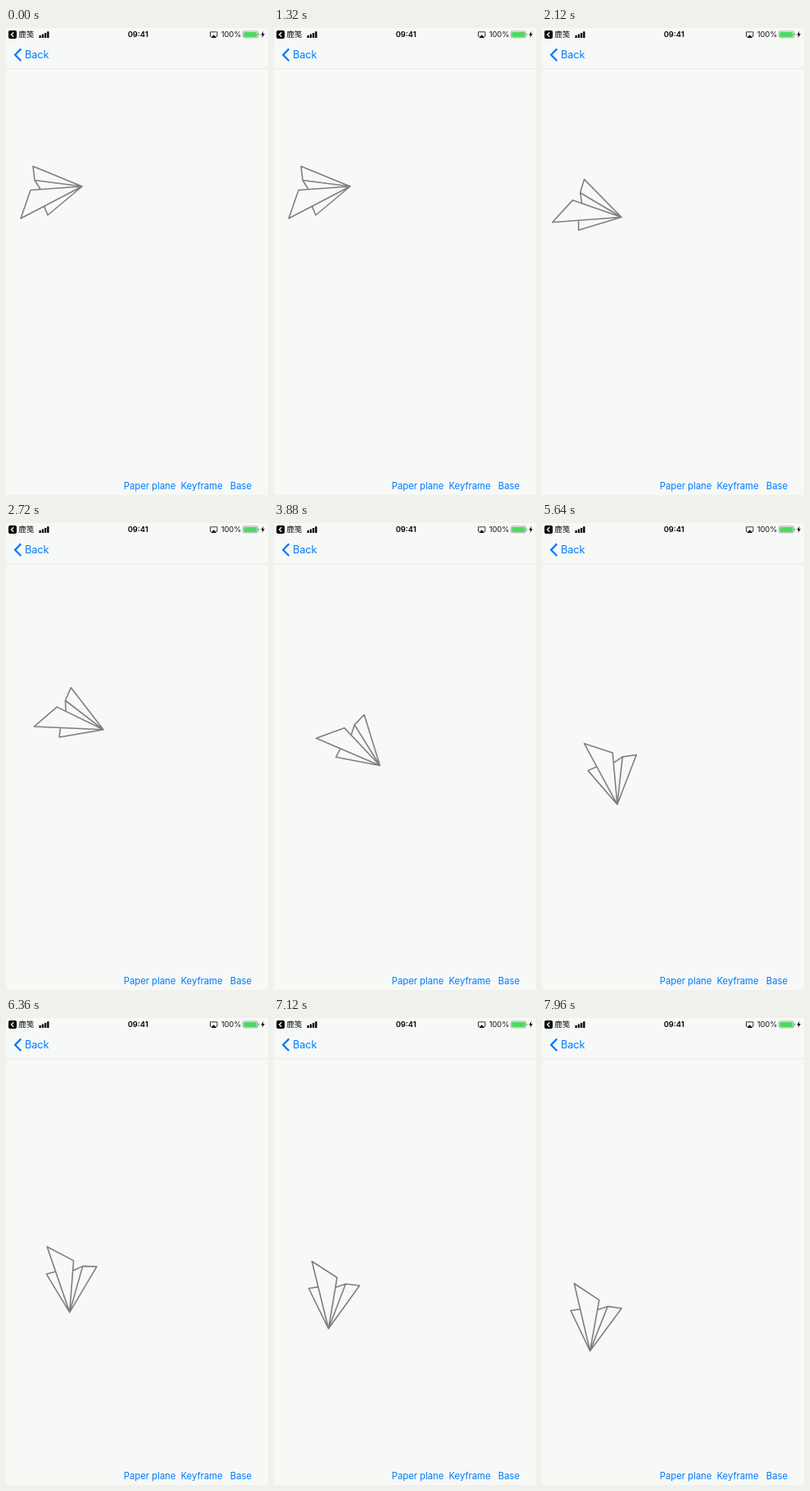
Recreate the animation shown at these times as an HTML page. Size 320x569 px, loop 8 s.

```html
<!DOCTYPE html>
<html lang="en">
<head>
<meta charset="utf-8">
<title>Paper plane</title>
<style>
  html, body { margin: 0; width: 100%; height: 100%; overflow: hidden; background: #f7f9f7; }
  svg { display: block; width: 320px; height: 569px; font-family: Inter, sans-serif; }
  .tint { fill: #007aff; }
  .nav { font-size: 12.8px; letter-spacing: -.12px; }
  .tool { font-size: 11.3px; letter-spacing: -.03px; }
  .status { font-size: 9.4px; fill: #111; }
  .clock { font-weight: 600; fill: #000; }
  .cjk { font-family: "Noto Sans CJK SC", "Noto Sans CJK", sans-serif; font-size: 9.6px; }
  .plane { fill: none; stroke: #7f7f7f; stroke-width: 1.6; stroke-linejoin: round; }
</style>
</head>
<body>
<svg viewBox="0 0 320 569">
  <rect width="320" height="569" fill="#f7f9f7"/>

  <!-- status bar -->
  <rect x="3" y="3" width="10" height="10" rx="2"/>
  <path d="M9.3 5.2 6.4 8l2.9 2.8" fill="none" stroke="#fff" stroke-width="1.3"/>
  <text class="status cjk" x="15.2" y="11.4">鹿笺</text>
  <path d="M40.5 9h2.3v3h-2.3zM43.8 7.6h2.3V12h-2.3zM47 6h2.3v6H47zM50.2 4.2h2.3V12h-2.3z"/>
  <text class="status clock" x="161.2" y="11.4" text-anchor="middle">09:41</text>
  <path d="M251 10.2h-1.5V4.8h8.4v5.4h-1.5" fill="none" stroke="#222" stroke-width=".9"/>
  <path d="M253.7 8.2 257 12h-6.6z"/>
  <text class="status" x="287.5" y="11.4" text-anchor="end">100%</text>
  <rect x="289.4" y="3.9" width="18.2" height="8" rx="1.8" fill="none" stroke="#8b8d8b" stroke-width=".7"/>
  <rect x="290.4" y="4.9" width="16.2" height="6" rx="1" fill="#4cd964"/>
  <path d="M308.4 6.4q1 .3 1 1.5t-1 1.5z" fill="#8b8d8b"/>
  <path d="M314.6 3.8 311.3 8.4h2.1l-.9 3.6 3.5-4.8h-2.2z"/>

  <!-- navigation bar -->
  <path d="M18.3 25.4 11.1 32.7l7.2 7.3" fill="none" stroke="#007aff" stroke-width="2.3"/>
  <text class="tint nav" x="22.9" y="37.4">Back</text>
  <rect y="49" width="320" height="1" fill="#e8eae8"/>

  <!-- origin is the corner that rides along the curve -->
  <path id="plane" class="plane"
        d="M78 32 18 7.5 20 24.5zM20 24.5 27 35.5M78 32 15 36.5 3 71zM31.5 56.4 36 67 78 32"/>

  <!-- tool bar -->
  <g class="tint tool">
    <text x="143.8" y="561.6">Paper plane</text>
    <text x="213.5" y="561.6">Keyframe</text>
    <text x="273.8" y="561.6">Base</text>
  </g>
</svg>
<script>
  const LOOP = 8000, STEP = 40, TAKEOFF = 1720;
  const TURN = 5.67; // seconds at which the plane heads about straight down
  const plane = document.getElementById('plane');

  // value and time derivative of a cubic in s, where s counts down to the turn
  const cubic = ([a, b, c, d], s) => [a + s * (b + s * (c + s * d)), -(b + s * (2 * c + 3 * d * s))];
  const curveX = [122.5, -.28, -4.25, -.67];
  const curveY = [265.3, -29.7, .88, -.0128];

  function pose(ms) {
    if (ms < TAKEOFF) return [15, 161, 0];
    const s = TURN - ms / 1000;
    const [x, dx] = cubic(curveX, s);
    const [y, dy] = cubic(curveY, s);
    return [x, y, Math.atan2(dy, dx) * 180 / Math.PI];
  }

  function draw(now) {
    const ms = Math.floor(now % LOOP / STEP) * STEP;
    const [x, y, angle] = pose(ms);
    plane.setAttribute('transform', `translate(${x} ${y}) rotate(${angle})`);
  }

  const start = performance.now();
  function tick() {
    draw(performance.now() - start);
    requestAnimationFrame(tick);
  }
  tick();
</script>
</body>
</html>
```
